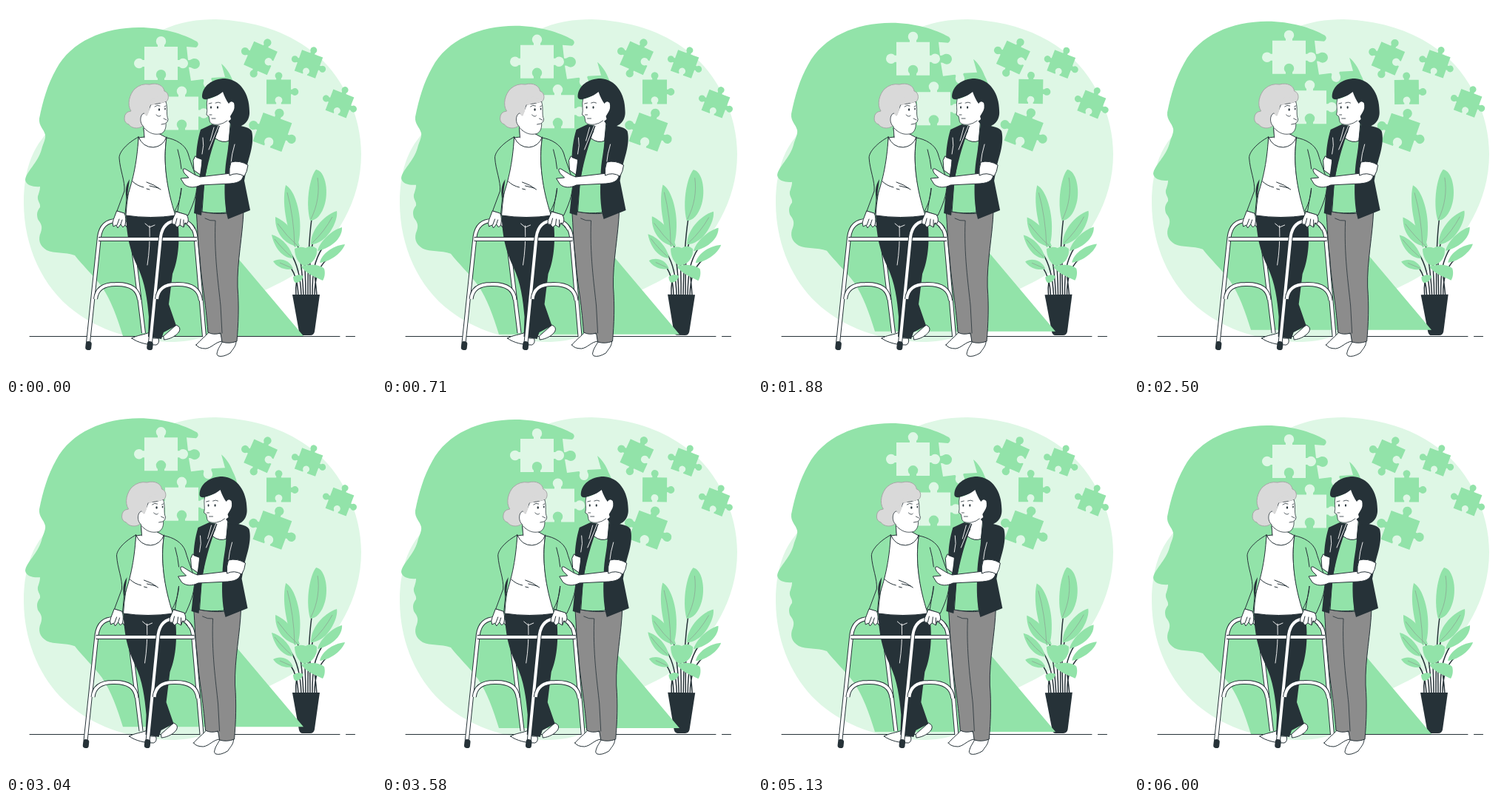
An HTML page that plays this animation: 500 by 500 pixels, repeating every 6.04 s.

```html
<!DOCTYPE html>
<html lang="en">
<head>
<meta charset="utf-8">
<title>Walking support</title>
<style>
html, body { margin: 0; width: 100%; height: 100%; overflow: hidden; background: #fff; }
svg { display: block; width: 100%; height: 100%; }
.green { fill: #92e3a9; }
.light { fill: #def7e5; }
.dark { fill: #263238; }
.hair { fill: #d9d9d9; }
.ink { stroke: #263238; stroke-width: 1; stroke-linecap: round; stroke-linejoin: round; }
.thin { stroke-width: .8; }
.stem { stroke-width: 1.5; }
.skin { fill: #fff; }
.line { fill: none; }
.glint { fill: none; stroke: #fff; stroke-width: .9; stroke-linecap: round; }
.vein { fill: none; stroke: #8ba894; stroke-width: .8; }
.tube path { fill: none; }
</style>
</head>
<body>
<svg viewBox="0 0 500 500">
  <path class="light" d="M210 33C235 21 260 18 283 18C335 20 378 34 412 60C455 92 480 148 480 200C480 265 445 317 405 352C385 368 370 374 350 384C315 405 305 430 270 446C253 452 240 454 221 454C169 452 126 438 92 412C49 380 24 324 24 266C24 230 32 200 50 178C90 120 150 70 210 33Z"/>

  <g id="plant">
    <path class="ink line stem" d="M395 391C394 372 391 363 384 352M399 391C398 366 393 347 385 335M402 391C401 370 398 330 390 310M405 391C405 360 403 350 404 340M408 391C408 345 410 310 413 288M411 391C411 360 409 340 415 318M414 391C414 360 416 345 428 326M417 391C417 368 422 353 434 342M392 391C391 380 392 376 393 370M420 391C419 378 418 371 417 362"/>
    <g class="green">
      <path d="M411 290C404 265 411 230 419 221C431 223 436 248 431 267C427 282 419 290 411 290Z"/>
      <path d="M378 242C390 248 400 280 397 309C396 320 394 325 390 326C383 309 371 270 378 242Z"/>
      <path d="M364 285C376 290 391 303 397 325C381 325 363 310 364 285Z"/>
      <path d="M359 309C371 312 385 325 388 341C373 341 362 325 359 309Z"/>
      <path d="M361 345C369 340 383 342 388 355C378 358 366 353 361 345Z"/>
      <path d="M447 277C449 288 439 308 428 316C421 321 416 322 412 322C411 305 428 283 447 277Z"/>
      <path d="M454 299C455 311 443 326 421 331C424 318 440 303 454 299Z"/>
      <path d="M458 322C455 332 440 345 424 347C426 336 440 324 458 322Z"/>
      <path d="M390 328Q397 324 405 327Q413 322 420 328C421 342 412 350 402 351C395 348 390 338 390 328Z"/>
      <path d="M399 352C412 348 425 350 430 355C432 362 430 368 428 371C418 366 405 362 399 352Z"/>
      <path d="M388 366Q395 361 402 365Q399 374 391 374Q388 371 388 366Z"/>
    </g>
    <path class="vein" d="M412 288C421 270 424 250 421 232M390 324Q389 285 380 252M394 324Q380 312 367 294M386 339Q375 330 363 315M386 354L370 347M414 320Q430 305 441 285"/>
    <path class="dark" d="M387 390H424L417 440Q416 445 411 445H401Q397 445 396 440Z"/>
  </g>

  <g id="head">
    <path class="green" d="M45 152C50 128 56 106 68 85C88 48 132 29 180 29C212 29 240 38 258 48Q262 52 257 56L244 55L246 73C250 74 250 71 255 71A7 7 0 0 1 255 85C251 85 250 82 247 83L250 101L266 99C269 100 266 103 267 106A6 6 0 0 0 279 104C279 101 276 99 278 97L296 96L291 78C298 84 303 92 306 100C320 125 318 170 310 205C300 250 297 290 300 325L402 446H158C150 420 142 398 130 380C118 364 103 350 93 337C80 332 65 335 55 330C45 324 43 315 47 306C50 297 47 294 43 288C41 281 42 277 46 272C47 266 42 264 43 257C45 251 46 248 46 244C39 245 27 243 26 235C27 224 43 212 48 194C50 186 54 180 53 174C51 166 44 162 45 152Z"/>
    <g id="holes" class="light"></g>
  </g>

  <g id="pieces" class="green"></g>
  <path class="ink" d="M32 446.500H451M459.500 446.500H471.500"/>

  <g id="people">
    <g class="tube">
      <g data-tube="M111 455L126 312Q129 290 150 290Q168 291 170 310L186 442"/>
      <g data-tube="M121 396Q123 376 148 376Q178 375 180 397"/>
      <g data-tube="M248 296Q256 300 257 318L268 447"/>
    </g>

    <!-- Older woman -->
    <path class="ink skin" d="M170 449C176 445 188 444 194 441L199 449L206 449Q208 456 203 458C191 458 178 455 170 449Z"/>
    <path class="ink skin" d="M213 446L230 431Q237 434 234 440C230 446 222 450 214 451Z"/>
    <path class="dark" d="M162 282H231C237 320 231 348 225 362L220 403L230 432L213 441L210 450L192 447L193 420C191 397 188 374 178 353C167 330 163 310 162 282Z"/>
    <path class="glint" d="M194 297Q195 325 191 350M188 294L194 299L201 296"/>
    <path class="ink skin" d="M186 165L187 177L179 178C176 210 164 245 162 283Q195 288 230 283C217 245 212 210 217 178L206 172Z"/>
    <path class="ink line" d="M179 177Q185 191 199 191Q212 190 217 177M171 237Q177 243 186 245M190 238Q200 241 209 248M194 243L206 246M190 247L194 248"/>
    <path class="ink green" d="M179 177C164 185 153 197 153 205C154 222 161 236 160 250L150 277L161 281L163 260C170 240 177 215 179 177Z"/>
    <path class="dark" d="M167 234C161 243 161 252 163 263Z"/>
    <path class="hair" stroke="#a6a6a6" d="M160 152Q160 143 169 142C163 133 167 119 174 112Q183 104 194 106C205 103 213 108 214 115C221 117 221 128 215 130L190 149L187 160C180 168 169 165 166 160Q160 158 160 152Z"/>
    <path class="ink thin skin" d="M187 178L186 163C180 158 181 147 186 145Q189 145 190 148L196 133Q205 133 216 129C219 139 216 146 219 153Q219 157 216 158C217 166 213 173 207 173C200 174 195 172 190 168"/>
    <path class="hair" d="M187 146C187 136 194 127 204 122L217 128Q212 133 205 130Q199 135 194 133Q195 142 190 149Z"/>
    <path class="ink thin line" d="M201 136Q204 133 208 135M214 136L216 135M203 147Q207 151 209 148M210 160L215 159M213 152L217 154M190 168L187 165"/>
    <ellipse class="dark" cx="207" cy="140" rx="1.2" ry="1.8"/>
    <ellipse class="dark" cx="215" cy="139" rx=".8" ry="1.6"/>

    <g class="tube">
      <g data-tube="M125 315H258"/>
      <g data-tube="M195 455L209 312Q212 290 233 290Q248 290 253 302"/>
      <g data-tube="M204 396Q206 376 230 376Q261 375 263 398"/>
    </g>
    <g class="dark">
      <rect x="107.500" y="453" width="8" height="12" rx="3.500" transform="rotate(6 111 459)"/>
      <rect x="190.500" y="453" width="8" height="12" rx="3.500" transform="rotate(6 194 459)"/>
    </g>
    <path class="ink skin" d="M150 277L160 280Q163 286 161 296L158 299L155 295L151 300L149 296L145 298Q143 293 145 289Z"/>
    <path class="ink line" d="M155 295L157 289M150 296L153 288"/>

    <!-- Nurse -->
    <path class="ink skin" d="M257 458C264 450 270 446 274 441L291 443L292 453C283 454 278 462 270 463Q260 463 257 458Z"/>
    <path class="ink skin" d="M285 470C286 462 291 458 293 452L311 453C311 460 306 464 303 469Q293 475 287 473Z"/>
    <path class="ink" fill="#8c8c8c" d="M257 275L265 278Q285 282 300 280L321 276C320 310 312 345 313 380C315 405 314 430 312 453Q302 457 292 454L290 442Q280 445 273 441C270 400 263 365 262 340C259 320 259 300 257 275Z"/>
    <path class="ink thin line" d="M269 287Q276 291 283 290C281 335 287 375 290 405L292 442"/>
    <path class="ink skin" d="M256 203L265 207L264 229L254 222L253 209Z"/>
    <path class="ink skin" d="M287 155L286 170L278 183L301 184L304 150Z"/>
    <path class="ink green" d="M283 179Q292 186 302 182L297 235L298 279Q280 281 265 278L268 235L276 190Z"/>
    <path class="dark" d="M278 160L263 167C259 180 257 195 257 205L265 208L262 228L258 240L254 280L264 283L268 240C271 220 276 197 289 162Z"/>
    <path class="dark" d="M304 158C314 163 328 162 332 169C336 184 329 203 326 215L322 236L330 276L300 288C295 270 295 250 296 230C296 210 301 195 301 180Z"/>
    <path class="glint" d="M287 162L274 194M281 164L276 182M266 178Q268 188 265 200M309 187Q305 200 304 212"/>
    <path class="dark" d="M265 123C265 108 279 98 296 98C316 99 329 118 329 142C330 156 320 164 310 163Q302 161 299 152L290 120L272 126Q266 127 265 123Z"/>
    <path class="skin" d="M272 126C281 124 288 120 293 116C295 122 298 128 301 132Q304 127 308 131Q310 138 306 144L303 149L304 153C300 156 295 160 288 161C280 161 275 159 275 154L274 149L271 147C273 140 270 133 272 126Z"/>
    <path class="ink thin line" d="M272 126C270 133 273 140 271 147L274 149L275 154C275 159 280 161 288 160Q294 159 299 155M274 132L278 131M283 131Q287 129 290 131M278 152L283 152M275 147L278 147"/>
    <ellipse class="dark" cx="277" cy="137" rx="1" ry="1.700"/>
    <ellipse class="dark" cx="286" cy="137" rx="1.100" ry="1.800"/>

    <!-- Held arm and supporting hand -->
    <path class="ink green" d="M217 178C229 180 242 187 246 199C250 214 258 230 258 241C258 256 252 270 246 283L228 277C235 265 237 252 237 246L231 283L229 283C217 247 212 210 217 178Z"/>
    <path class="ink line" d="M232 194Q236 208 237 220"/>
    <path class="ink skin" d="M230 278L244 282Q248 288 245 294L242 293L240 299L235 296L231 299L228 295Q223 296 225 289Z"/>
    <path class="ink line" d="M240 298L240 289M235 296L236 288M229 295L231 287"/>
    <path class="ink skin" d="M321 226C321 235 316 239 303 240L263 242C255 246 247 246 241 241L236 233L247 232L241 226Q237 219 242 220L255 228L262 231L304 226Z"/>
    <path class="ink skin" d="M304 211Q316 208 327 215Q326 224 322 230Q312 224 302 229Q301 220 304 211Z"/>
  </g>
</svg>
<script>
const LOOP = 6040;   // the cycle rests on its last pose before restarting
const CYCLE = 6000;
const $ = id => document.getElementById(id);

function add(parent, attrs) {
  const el = document.createElementNS("http://www.w3.org/2000/svg", "path");
  for (const k in attrs) el.setAttribute(k, attrs[k]);
  parent.append(el);
}

// Jigsaw piece: sides run top, right, bottom, left; 1 = knob, -1 = socket, 0 = flat.
function jigsaw(parent, x, y, half, angle, sides) {
  let d = `M${-half} ${-half}`;
  sides.forEach((k, i) => {
    const c = [1, 0, -1, 0][i], s = [0, 1, 0, -1][i];
    const v = (a, b) => `${half * (a * c - b * s)} ${half * (a * s + b * c)}`;
    const r = half * .3;
    d += k
      ? `l${v(.8, 0)}l${v(0, -.1 * k)}a${r} ${r} 0 1 ${k > 0 ? 1 : 0} ${v(.4, 0)}l${v(0, .1 * k)}l${v(.8, 0)}`
      : `l${v(2, 0)}`;
  });
  add(parent, { d: d + "Z", transform: `translate(${x} ${y}) rotate(${angle})` });
}

jigsaw($("holes"), 209.5, 77.5, 22.5, 0, [1, 1, -1, 1]);
jigsaw($("holes"), 237.5, 145, 22.5, 0, [1, 1, -1, 1]);
[
  [344, 70.5, 17.3, 24, [1, -1, 1, 1]],
  [409, 78.5, 15, 20, [1, 1, -1, 1]],
  [368.5, 116, 16.5, 0, [1, 1, -1, 0]],
  [451, 132, 15, 21, [1, 1, -1, 1]],
  [360, 170.5, 20.6, 20, [1, 1, -1, 1]]
].forEach(p => jigsaw($("pieces"), ...p));

for (const g of document.querySelectorAll("[data-tube]")) {
  const d = g.dataset.tube;
  add(g, { d, stroke: "#263238", "stroke-width": 6 });
  add(g, { d, stroke: "#fff", "stroke-width": 4 });
}

// Linear interpolation over evenly spaced stops.
function along(stops, p) {
  const n = stops.length - 1, i = Math.min(n - 1, Math.floor(p * n));
  return stops[i] + (stops[i + 1] - stops[i]) * (p * n - i);
}

const FLOAT = [0, -10, 0];
const SHAKE = [0, -1, 2, -4, 4, -4, 4, -4, 2, -1, 0];
const WIND = [0, 1, 0, -1, 0];

function draw(now) {
  const p = Math.min(now % LOOP / CYCLE, 1);
  const move = (id, value) => $(id).setAttribute("transform", value);
  move("head", `translate(0 ${along(FLOAT, p)})`);
  move("people", `translate(${along(SHAKE, p)} 0)`);
  move("plant", `rotate(${along(WIND, p * 2 % 1)} 408 333)`);
  move("pieces", `rotate(${along(WIND, p * 4 % 1)} 396 121)`);
}

const start = performance.now();
function tick() {
  draw(performance.now() - start);
  requestAnimationFrame(tick);
}
tick();
</script>
</body>
</html>
```
